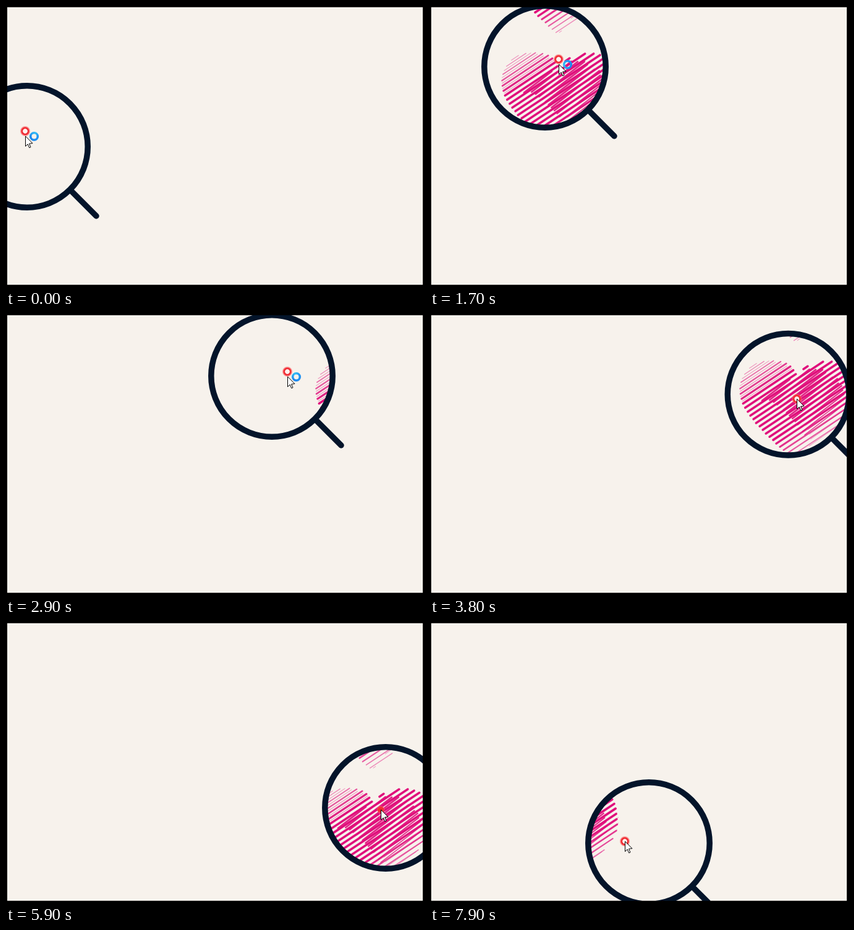
These frames come from a looping animation (676x452 px, 8 s). An HTML page with a canvas:

```html
<!DOCTYPE html>
<html lang="en">
<head>
<meta charset="utf-8">
<title>Magnifier over hidden hearts</title>
<style>
  html, body { margin: 0; width: 100%; height: 100%; overflow: hidden; background: #f7f2ec; }
  canvas { display: block; }
</style>
</head>
<body>
<canvas id="stage" width="676" height="452"></canvas>
<script>
const ctx = document.getElementById('stage').getContext('2d');
const W = 676, H = 452, LOOP = 8000, STEP = 100, BUSY_END = 3800;
const INK = '#03142a', PINK = '#e00f7c', PAPER = '#f7f2ec';
const TAU = Math.PI * 2;
const clamp = v => Math.max(0, Math.min(1, v));

// time, lens centre x and y, pointer offset from the lens x and y
const keys = [
  [0, 34, 227, -3, -17],
  [900, 64, 131.5, 9, -11],
  [1700, 186, 98, 22, -4],
  [1800, 209.5, 97.5, 23, -3],
  [2700, 402.5, 98.5, 25, 0],
  [2900, 430, 100, 25, 1],
  [3600, 559, 119.5, 17, 6],
  [4500, 623, 175, 1, 11],
  [4700, 629, 197, -2, 11],
  [5400, 628, 268, -5, 8],
  [5900, 614, 300, -8, 3],
  [6300, 596, 320, -11, 3],
  [6700, 566, 338, -14, 2],
  [7200, 503, 353, -25, 0],
  [7900, 354, 357, -39, -3]
];

function slope(i, c) {
  const a = keys[Math.max(0, i - 1)], b = keys[Math.min(keys.length - 1, i + 1)];
  return (b[c] - a[c]) / (b[0] - a[0]);
}

// Smooth cubic through the keys
function pose(t) {
  let i = 0;
  while (i < keys.length - 2 && keys[i + 1][0] <= t) i++;
  const a = keys[i], b = keys[i + 1], d = b[0] - a[0];
  const u = clamp((t - a[0]) / d), v = 1 - u;
  return [1, 2, 3, 4].map(c =>
    a[c] * v * v * (1 + 2 * u) + b[c] * u * u * (3 - 2 * u) +
    d * u * v * (v * slope(i, c) - u * slope(i + 1, c)));
}

const heart = new Path2D('M95 22C85 5 65 0 50 0C22 0 0 22 0 48C0 85 45 120 90 165' +
  'C130 130 190 95 190 52C190 22 170 0 145 0C125 0 108 8 95 22Z');
const strokes = [];

// Parallel pen strokes kept inside the heart
function hatch(degrees, from, to, gap, pen, head = 0, tail = 1) {
  const a = degrees * Math.PI / 180, dx = Math.cos(a), dy = -Math.sin(a);
  for (let n = from; n < to; n += gap) {
    const at = s => [s * dx - n * dy, s * dy + n * dx];
    let start = null;
    for (let s = -180; s < 240; s++) {
      const inside = ctx.isPointInPath(heart, ...at(s));
      if (inside && start === null) start = s;
      if (!inside && start !== null) {
        const len = s - start, wobble = Math.sin(n * 9) * 2;
        if (len > 5) strokes.push({
          a: at(start + len * head + 1),
          b: at(start + len * tail - 2 + wobble),
          ...pen(n)
        });
        start = null;
      }
    }
  }
}

// Bold strokes, fine ones at both fading ends, then a steeper dense layer
const strength = n => clamp(Math.min((n - 15) / 45, (192 - n) / 50));
hatch(33.5, 15.8, 188, 7.6, n => ({ width: 0.8 + 2.8 * strength(n), alpha: 0.35 + 0.65 * strength(n) }));
hatch(33.5, 19.6, 64, 7.6, n => ({ width: 1.1, alpha: 0.4 }));
hatch(35, 140, 188, 7.6, n => ({ width: 1, alpha: 0.45 }), 0.35);
hatch(37.5, 74, 160, 6.6, n => ({ width: 1.2 + 1.6 * clamp((160 - n) / 40), alpha: 0.9 }), 0.28, 0.86);

function drawHeart(x, y) {
  ctx.save();
  ctx.translate(x, y);
  ctx.strokeStyle = PINK;
  ctx.lineCap = 'round';
  for (const s of strokes) {
    ctx.globalAlpha = s.alpha;
    ctx.lineWidth = s.width;
    ctx.beginPath();
    ctx.moveTo(...s.a);
    ctx.lineTo(...s.b);
    ctx.stroke();
  }
  ctx.restore();
}

function circle(x, y, r) {
  ctx.beginPath();
  ctx.arc(x, y, r, 0, TAU);
}

function drawLens(x, y) {
  ctx.save();
  circle(x, y, 95);
  ctx.clip();
  for (const hx of [115, 500])
    for (const hy of [-118, 75, 268]) drawHeart(hx, hy);
  ctx.restore();

  ctx.strokeStyle = INK;
  ctx.lineWidth = 9.5;
  ctx.lineCap = 'round';
  circle(x, y, 98.2);
  ctx.stroke();
  ctx.beginPath();
  ctx.moveTo(x + 71, y + 71);
  ctx.lineTo(x + 112, y + 112);
  ctx.stroke();
}

function drawSpot(x, y, t) {
  const pulse = Math.max(0, Math.cos((t - 300) / 800 * TAU)) ** 4;
  const r = 8.5 - 2 * pulse, core = 0.5 * (1 - pulse);
  const g = ctx.createRadialGradient(x, y, 0, x, y, r);
  g.addColorStop(0, '#fff4f0');
  g.addColorStop(core * 0.8, '#fff0ec');
  g.addColorStop(core, '#ee2a30');
  g.addColorStop(0.7, '#f2303a');
  g.addColorStop(0.85, 'rgba(250,90,90,.6)');
  g.addColorStop(1, 'rgba(255,120,120,.1)');
  ctx.fillStyle = g;
  circle(x, y, r);
  ctx.fill();
}

function drawSpinner(x, y, t) {
  const g = ctx.createConicGradient(t / 1000 * TAU, x, y);
  g.addColorStop(0, '#2196f3');
  g.addColorStop(0.45, '#1c86ee');
  g.addColorStop(0.8, '#35bdf5');
  g.addColorStop(1, '#2196f3');
  ctx.strokeStyle = g;
  ctx.lineWidth = 3.6;
  circle(x, y, 5.8);
  ctx.stroke();
}

const arrow = new Path2D('M.5 .5V16.5L4.2 13L6.7 18.8L9 17.8L6.5 12.2L11.6 11.7Z');

function drawPointer(x, y, t) {
  const busy = t < BUSY_END;
  drawSpot(x, busy ? y - 8 : y, t);
  if (busy) drawSpinner(x + 14.5, y + 0.5, t);
  ctx.save();
  ctx.translate(Math.round(x), Math.round(y));
  ctx.fillStyle = '#fff';
  ctx.strokeStyle = '#000';
  ctx.lineWidth = 1;
  ctx.fill(arrow);
  ctx.stroke(arrow);
  ctx.restore();
}

function draw(t) {
  const [x, y, dx, dy] = pose(t);
  ctx.fillStyle = PAPER;
  ctx.fillRect(0, 0, W, H);
  drawLens(x, y);
  ctx.strokeStyle = '#000';
  ctx.lineWidth = 2;
  ctx.strokeRect(1, 1, W - 2, H - 2);
  drawPointer(x + dx, y + dy, t);
}

const begin = performance.now();
function frame() {
  const t = (performance.now() - begin) % LOOP;
  draw(Math.floor(t / STEP) * STEP);
  requestAnimationFrame(frame);
}
frame();
</script>
</body>
</html>
```
